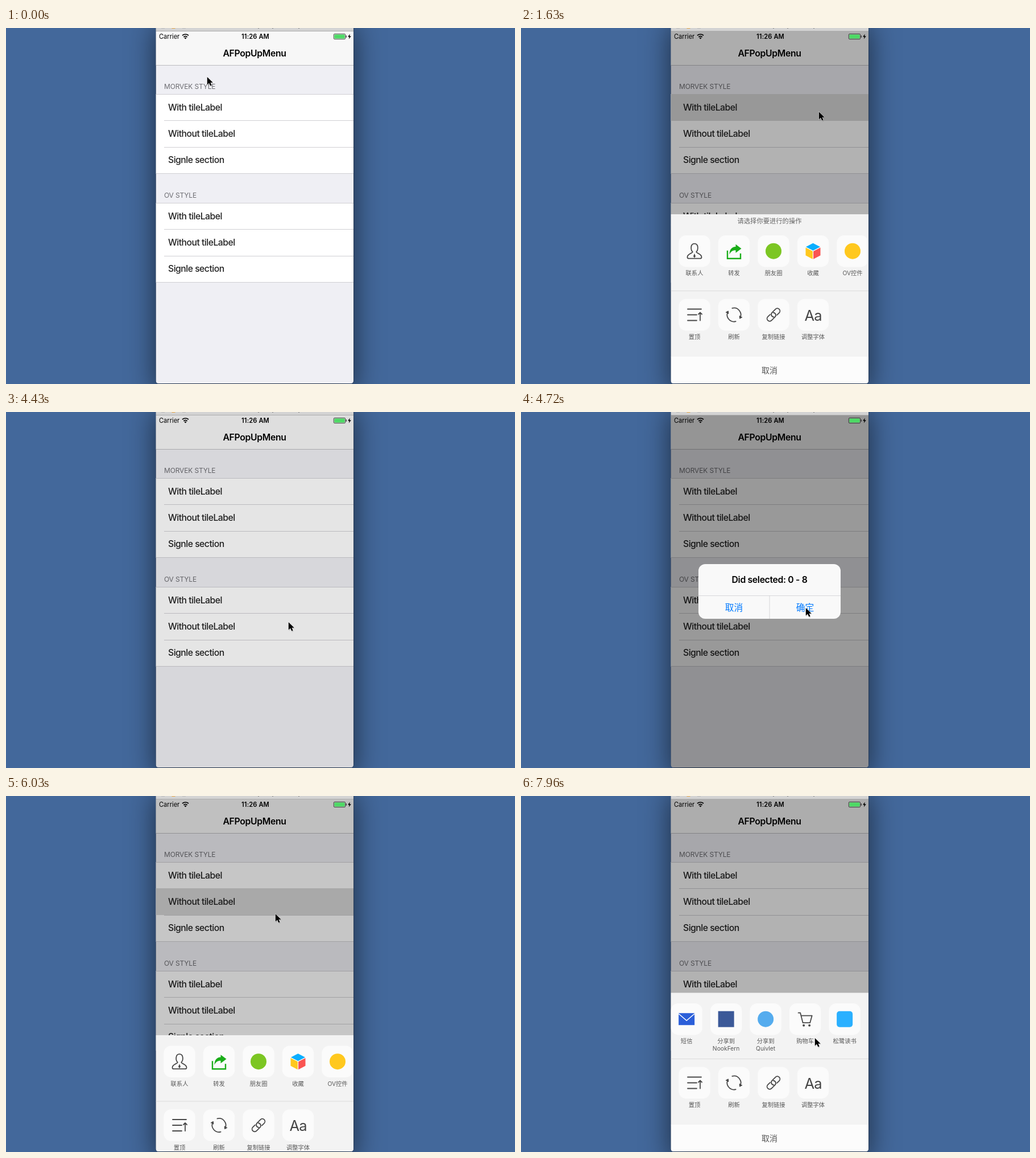
Write an HTML page that moves like this. It is 895 by 625 pixels and loops after 8000 ms.

```html
<!DOCTYPE html>
<html lang="zh">
<head>
<meta charset="utf-8">
<title>AFPopUpMenu</title>
<style>
  html, body { margin: 0; width: 100%; height: 100%; overflow: hidden; background: #43689b; }
  svg { display: block; position: absolute; left: 0; top: 0; }
  #shadow {
    position: absolute; left: 264px; top: -20px; width: 347px; height: 644px;
    border-radius: 5px;
    box-shadow: 0 0 0 1px rgba(0,0,0,.2), 0 16px 50px rgba(0,0,0,.6);
  }
  text { font-family: Inter, "Noto Sans CJK SC", "Noto Sans CJK", sans-serif; }
  .mid, .label, .ask, .cancel, .button { text-anchor: middle; }
  .nav { font-size: 15.75px; font-weight: 600; letter-spacing: -.33px; }
  .row { font-size: 15.75px; font-weight: 500; letter-spacing: -.52px; fill: #222; }
  .head { font-size: 12px; letter-spacing: -.15px; fill: #6d6d72; }
  .status { font-size: 11.1px; }
  .label { font-size: 10.3px; fill: #585858; }
  .ask { font-size: 11.3px; fill: #666; }
  .cancel { font-size: 14px; fill: #555; }
  .button { font-size: 15.75px; fill: #007aff; }
  .line { fill: none; stroke: #484848; stroke-width: 1.8; stroke-linecap: round; stroke-linejoin: round; }
  .green { fill: none; stroke: #1aad19; stroke-width: 2.4; }
</style>
</head>
<body>
<div id="shadow"></div>
<svg id="stage" width="895" height="625" viewBox="0 0 895 625"></svg>
<script>
const LEFT = 263.5, WIDTH = 347.5, RIGHT = LEFT + WIDTH, MIDDLE = 437;
const GAP = 69.5, FIRST = 305, ROW = 46.35;
const rect = (x, y, w, h, fill, more = '') =>
  `<rect x="${x}" y="${y}" width="${w}" height="${h}" fill="${fill}" ${more}/>`;
const band = (y, h, fill, more) => rect(LEFT, y, WIDTH, h, fill, more);
const text = (x, y, cls, s, more = '') => `<text x="${x}" y="${y}" class="${cls}" ${more}>${s}</text>`;
const line = d => `<path class="line" d="${d}"/>`;
const turned = (angle, s) => `<g transform="rotate(${angle})">${s}</g>`;
const twice = s => s + turned(180, s);
const dot = fill => `<circle r="14" fill="${fill}"/>`;
const square = (fill, r = 0) => rect(-14, -14, 28, 28, fill, `rx="${r}"`);
const wheel = x => `<circle cx="${x}" cy="11" r="2" fill="#484848"/>`;

// Icons are drawn around their own centre
const icons = {
  person: line('M-3.2 1.5C-6.8-2-7.5-13 0-13S6.8-2 3.2 1.5C3.5 4 12.5 4.5 12.5 10.5Q12.5 13 10 13H-10Q-12.5 13-12.5 10.5C-12.5 4.5-3.5 4-3.2 1.5Z')
    + '<path d="M0 4L2 9 0 12-2 9Z" fill="#484848"/>',
  share: '<path class="green" d="M-11.5-1V13H11.5V4"/>'
    + '<path d="M3-12L13-4.5 3 3V-1.5C-3-1.5-6 1-8 6-8-3-4-7.5 3-7.8Z" fill="#1aad19"/>',
  cube: '<path d="M0-14L12.5-7.5 0-1-12.5-7.5Z" fill="#0aaeff"/>'
    + '<path d="M-13-6.3L-.6 .2V14L-13 7.5Z" fill="#ffc81e"/>'
    + '<path d="M13-6.3L.6 .2V14L13 7.5Z" fill="#fa5452"/>',
  mail: rect(-14, -10.5, 28, 21, '#2b5fd9')
    + '<path d="M-14-9.5L0 2.5 14-9.5" fill="none" stroke="#fff" stroke-width="1.5"/>',
  cart: line('M-12-11H-8.5L-4 6.5H8.5L12-6H-7') + wheel(-2.5) + wheel(7.5),
  top: line('M-12-10H12M-12 0H4M-12 10H4M10 10V-4M7-1L10-4 13-1'),
  refresh: twice(line('M-3.1-11.6A12 12 0 0 1 10.4 6M13.6 4.3L10.4 6 10.1 2.4')),
  link: turned(-45, twice(line('M-4-4.6H-9.5A4.6 4.6 0 0 0-9.5 4.6H-1A4.6 4.6 0 0 0 2.5-3'))),
  font: text(0, 10, 'mid', 'Aa', 'font-size="25.5" letter-spacing="-1" fill="#444"')
};

const shareItems = [
  [icons.person, '联系人'], [icons.share, '转发'], [dot('#7cc623'), '朋友圈'],
  [icons.cube, '收藏'], [dot('#ffc81e'), 'OV控件'], [icons.mail, '短信'],
  [square('#3b5998'), '分享到', 'NookFern'], [dot('#55acee'), '分享到', 'Quivlet'],
  [icons.cart, '购物车'], [square('#2ab0ff', 5), '松鹭读书']
];
const toolItems = [
  [icons.top, '置顶'], [icons.refresh, '刷新'], [icons.link, '复制链接'], [icons.font, '调整字体']
];

const items = (list, y) => list.map(([icon, ...lines], i) =>
  `<g transform="translate(${FIRST + i * GAP} ${y})">`
  + rect(-27.7, -27.7, 55.4, 55.4, '#fbfbfb', 'rx="13"') + icon
  + lines.map((s, n) => text(0, 42.5 + n * 12.5, 'label', s)).join('') + '</g>').join('');

const names = ['With tileLabel', 'Without tileLabel', 'Signle section'];
const rowTop = (y, i) => Math.floor(y + .4 + i * ROW);
const rule = (x, y) => rect(x, y, RIGHT - x, 1, '#d0cfd3');
const section = (y, title) =>
  text(278, y - 9, 'head', title) + band(y, 139.5, '#fff')
  + [0, 1, 2, 3].map(i => rule(i % 3 ? 278 : LEFT, rowTop(y, i))).join('');
const rowNames = y => names.map((s, i) => text(285, y + 28.5 + i * ROW, 'row', s)).join('');

const statusBar =
  text(269, 19, 'status', 'Carrier')
  + '<g fill="none" stroke="#000" stroke-width="1.7"><path d="M310 13.2A8 8 0 0 1 321 13.2M312.3 15.8A4.8 4.8 0 0 1 318.7 15.8"/></g>'
  + '<path d="M315.5 19.5L313.5 17.4Q315.5 15.7 317.5 17.4Z"/>'
  + text(438.5, 19, 'status mid', '11:26 AM', 'font-weight="600" letter-spacing=".1"')
  + rect(576.3, 10.4, 20.4, 9.2, 'none', 'rx="1.6" stroke="#222" stroke-width=".8"')
  + rect(577.4, 11.5, 18.2, 7, '#4cd964', 'rx=".6"')
  + rect(597.6, 13.2, 1.2, 3.6, '#222')
  + '<path d="M604.8 10.5L601 15.6H603.6L602.8 19.6 606.8 14.2H604.2Z"/>';

const titleBar = band(0, 5, '#d3d3d3') + band(5, 1, '#adadad')
  + ['#bbb', '#f0a63a', '#bbb'].map((c, i) => rect(273 + i * 18.5, 0, 6, .9, c)).join('')
  + [443, 468, 514].map(x => rect(x, 0, 2, 1, '#888')).join('');

const alertBox = rect(312, 267, 250, 96, '#f9f9f9', 'rx="12"')
  + text(MIDDLE, 300, 'nav mid', 'Did selected: 0 - 8')
  + rect(312, 322, 250, .8, '#cfcfd2') + rect(436.6, 322, .8, 41, '#cfcfd2')
  + text(374.5, 349, 'button', '取消') + text(499.5, 349, 'button', '确定');

document.getElementById('stage').innerHTML = `
  <clipPath id="screen"><path d="M${LEFT} 0H${RIGHT}V619Q${RIGHT} 624 606 624H268.5Q${LEFT} 624 ${LEFT} 619Z"/></clipPath>
  <g clip-path="url(#screen)">
    ${band(0, 625, '#efeff4')}${band(6, 59, '#f7f7f7')}${band(65, 1, '#bcbcbf')}
    ${text(MIDDLE, 50, 'nav mid', 'AFPopUpMenu')}
    ${section(116, 'MORVEK STYLE')}${section(307, 'OV STYLE')}
    ${band(116, 47, '#d9d9d9', 'id="pressed"')}
    ${rowNames(116)}${rowNames(307)}
    ${band(6, 619, '#000', 'id="dim"')}
    ${titleBar}${statusBar}
    <g id="menu">
      ${band(345.5, 232, '#f3f3f3')}
      <g id="ask">${band(327, 19, '#f3f3f3')}${text(MIDDLE, 343.3, 'ask', '请选择你要进行的操作')}</g>
      <g id="strip">${items(shareItems, 391.7)}</g>
      ${band(461, 1, '#dcdcdc')}
      ${items(toolItems, 503.5)}
      ${band(577, 48, '#fcfcfc')}
      ${text(MIDDLE, 606, 'cancel', '取消')}
    </g>
    <g id="alert">${alertBox}</g>
  </g>
  <g id="cursor"><g transform="scale(.96)">
    <path d="M1.5 2.5V17L5 13.9 7.3 19 9.8 18 7.6 12.8H12Z" opacity=".18"/>
    <path d="M.8 1V15.2L4.2 12.1 6.5 17.3 9 16.2 6.7 11.1H11.2Z" stroke="#fff" paint-order="stroke"/>
  </g></g>`;

const TICK = 147.1, LOOP = 8000;
const TAP_1 = 9, FLICK_1 = 16, PICK = 30, CONFIRM = 35, TAP_2 = 40, FLICK_2 = 47;
const MENU_HEIGHT = 298, SCROLL_END = 361.5, LONGEST_MOVE = 5;

// Arrival tick and place; the pointer rests until it has to leave
const stops = [
  [0, 353, 85], [5, 523, 146], [16, 540, 396], [18, 410, 402], [20, 476, 541], [24, 521, 422],
  [28, 492, 392], [32, 500, 343], [38, 465, 183], [45, 543, 402],
  [49, 430, 410], [51, 458, 522], [54, 516, 424]
];

const ramp = (k, a, b) => Math.min(1, Math.max(0, (k - a) / (b - a)));
const smooth = p => p * p * (3 - 2 * p);
const easeOut = p => 1 - (1 - p) ** 2;

function pointer(k) {
  const i = Math.max(1, stops.findIndex(s => s[0] >= k));
  const [from, x0, y0] = stops[i - 1], [to, x1, y1] = stops[i];
  const p = smooth(ramp(k, Math.max(from, to - LONGEST_MOVE), to));
  return [x0 + (x1 - x0) * p, y0 + (y1 - y0) * p].map(Math.round);
}

// A flick runs past the end of the strip and springs back
function flick(t) {
  if (t <= 0) return 0;
  const damp = .716, turn = Math.PI / 4;
  const swing = Math.cos(turn * t) + damp / turn * Math.sin(turn * t);
  return SCROLL_END * (1 - Math.exp(-damp * t) * swing);
}

const el = id => document.getElementById(id);
const move = (id, x, y) => el(id).setAttribute('transform', `translate(${x} ${y})`);
const show = (id, on) => el(id).setAttribute('visibility', on ? 'inherit' : 'hidden');
const fade = (id, v) => el(id).setAttribute('opacity', v);

function draw(k) {
  const second = k >= TAP_2, tap = second ? TAP_2 : TAP_1;
  const open = second || k < PICK ? easeOut(ramp(k, tap, tap + 2)) : 0;
  const leave = 1 - ramp(k, CONFIRM, CONFIRM + 2.2);
  const alertDim = second ? 0 : ramp(k, PICK - .6, PICK + 1.8) * Math.max(.09, leave);

  move('cursor', ...pointer(k));
  move('strip', -flick(k - (second ? FLICK_2 : FLICK_1)), 0);
  move('menu', 0, MENU_HEIGHT * (1 - open));
  show('menu', open > 0);
  show('ask', !second);
  show('pressed', k >= tap && k < tap + 3);
  el('pressed').setAttribute('y', rowTop(116, second ? 1 : 0));
  fade('dim', Math.max(.3 * open, .4 * alertDim));
  fade('alert', ramp(k, PICK, PICK + 2) * leave);
}

const start = performance.now();
let last = -1;
function frame(now) {
  const t = Math.max(0, now - start) % LOOP;
  const k = Math.floor((t + 6) / TICK);
  if (k !== last) draw(last = k);
  requestAnimationFrame(frame);
}
draw(0);
requestAnimationFrame(frame);
</script>
</body>
</html>
```
